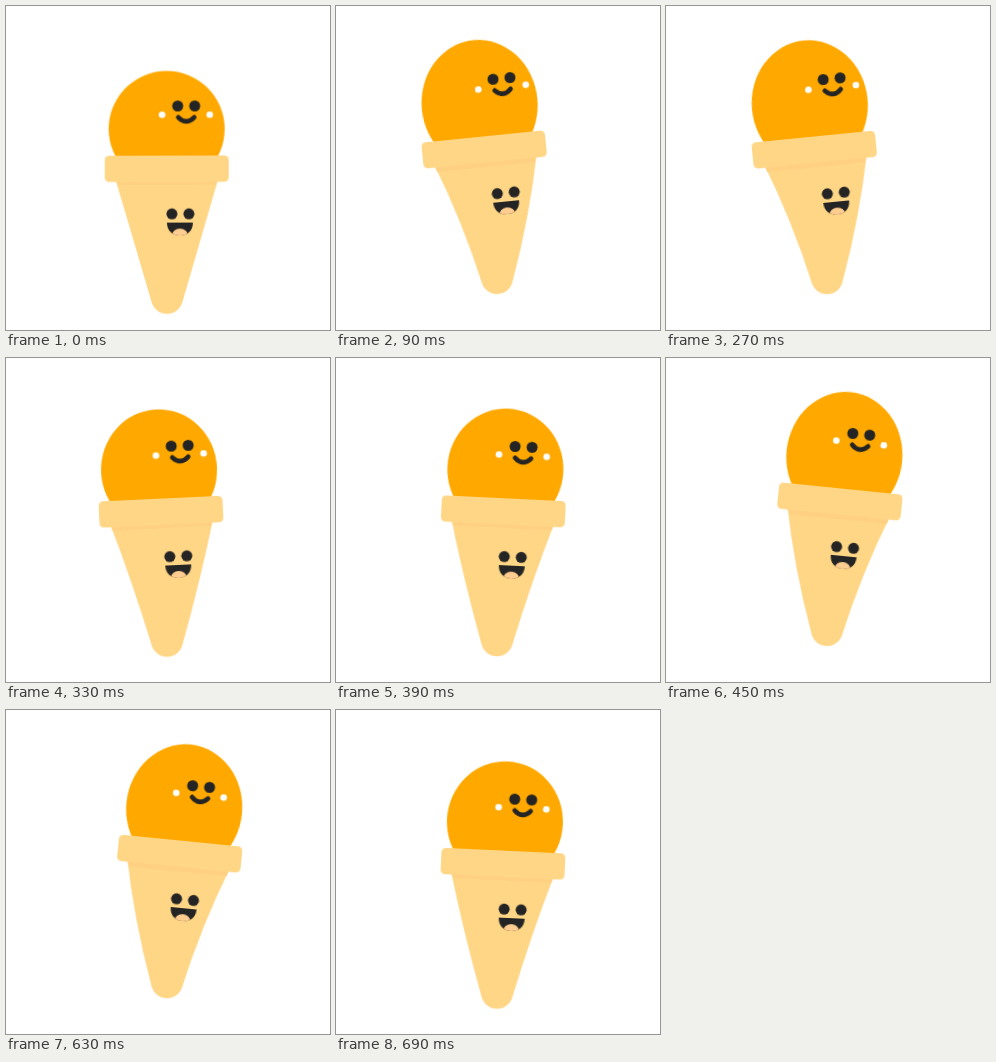
Recreate the animation shown at these times as an HTML page without scripts. Size 324 px wide and 324 px high, loop 0.72 s.

```html
<!DOCTYPE html>
<html lang="en">
<head>
<meta charset="utf-8">
<title>Dancing ice cream cone</title>
<style>
  html, body {
    margin: 0;
    width: 100%;
    height: 100%;
    overflow: hidden;
    background: #fff;
  }
  svg { display: block; width: 100vw; height: 100vh; }

  /* Each animation is half of a swing: out with cubic or quadratic easing, then back. */

  /* The whole cone jumps and leans left, then right, about its tip. */
  .sway { transform-origin: 161px 292px; animation: sway 720ms infinite; }
  @keyframes sway {
    0%, 50%, 100% {
      transform: translateY(0) rotate(0deg);
      animation-timing-function: cubic-bezier(.333, 1, .667, 1);
    }
    25% {
      transform: translateY(-23px) rotate(-6.5deg);
      animation-timing-function: cubic-bezier(.333, 0, .667, 0);
    }
    75% {
      transform: translateY(-23px) rotate(6.5deg);
      animation-timing-function: cubic-bezier(.333, 0, .667, 0);
    }
  }

  /* The sides of the cone bend while it leans. */
  .cone { animation: bend 720ms infinite; }
  @keyframes bend {
    0%, 50%, 100% {
      d: path("M108.6 170 Q127.1 233 145.6 296.5 A16 16 0 0 0 176.4 296.5 Q194.9 233 213.4 170 Z");
      animation-timing-function: cubic-bezier(.333, 1, .667, 1);
    }
    25% {
      d: path("M108.6 170 Q133.1 233 145.6 296.5 A16 16 0 0 0 176.4 296.5 Q200.9 233 213.4 170 Z");
      animation-timing-function: cubic-bezier(.333, 0, .667, 0);
    }
    75% {
      d: path("M108.6 170 Q121.1 233 145.6 296.5 A16 16 0 0 0 176.4 296.5 Q188.9 233 213.4 170 Z");
      animation-timing-function: cubic-bezier(.333, 0, .667, 0);
    }
  }

  /* The scoop stretches upwards on every jump and carries its face along. */
  .hop { animation: hop 360ms infinite; }
  @keyframes hop {
    0%, 100% {
      transform: translateY(0) scaleY(1);
      animation-timing-function: cubic-bezier(.333, .667, .667, 1);
    }
    50% {
      transform: translateY(var(--lift, 0px)) scaleY(var(--stretch, 1));
      animation-timing-function: cubic-bezier(.333, 0, .667, .333);
    }
  }

  /* Faces lag behind the lean. */
  .drift { animation: drift 720ms infinite; }
  @keyframes drift {
    0%, 50%, 100% {
      transform: translateX(0);
      animation-timing-function: cubic-bezier(.333, 1, .667, 1);
    }
    25% {
      transform: translateX(var(--lag));
      animation-timing-function: cubic-bezier(.333, 0, .667, 0);
    }
    75% {
      transform: translateX(calc(-1 * var(--lag)));
      animation-timing-function: cubic-bezier(.333, 0, .667, 0);
    }
  }

  .scoop { --stretch: 1.14; transform-origin: 161px 181.5px; fill: #ffa800; }
  .scoop-face { --lift: -8.5px; --lag: 5.5px; }
  .cone-face { --lag: 4.2px; }
  .wafer { fill: #ffd685; }
  .shade { --lift: 2px; fill: #ffcf82; }
  .ink { fill: #242424; }
  .cheek { fill: #fff; }
  .tongue { fill: #ffcd8f; }
  .smile { fill: none; stroke: #242424; stroke-width: 4.6; stroke-linecap: round; }
</style>
</head>
<body>
<svg viewBox="0 0 324 324">
  <defs>
    <path id="mouth" d="M161 217 H187 C187 225 181.5 230 174 230 S161 225 161 217 Z"/>
    <g id="eyes"><circle r="5.5"/><circle cx="17" r="5.5"/></g>
    <clipPath id="in-mouth"><use href="#mouth"/></clipPath>
  </defs>

  <g class="sway">
    <circle class="scoop hop" cx="161" cy="123.5" r="58"/>
    <path class="wafer cone" d="M108.6 170 Q127.1 233 145.6 296.5 A16 16 0 0 0 176.4 296.5 Q194.9 233 213.4 170 Z"/>
    <path class="shade hop" d="M109.4 170 H212.6 L210 179 H112 Z"/>
    <rect class="wafer" x="99" y="150" width="124" height="26.3" rx="4.5"/>

    <g class="scoop-face hop">
      <g class="drift">
        <use class="ink" href="#eyes" x="172" y="100.5"/>
        <path class="smile" d="M172.5 111.8 Q180.5 120 188.5 111.8"/>
        <circle class="cheek" cx="156.3" cy="109.3" r="3.3"/>
        <circle class="cheek" cx="204" cy="109.3" r="3.3"/>
      </g>
    </g>

    <g class="cone-face drift">
      <use class="ink" href="#eyes" x="166" y="208.3"/>
      <use class="ink" href="#mouth"/>
      <ellipse class="tongue" cx="174" cy="230" rx="8" ry="7" clip-path="url(#in-mouth)"/>
    </g>
  </g>
</svg>
</body>
</html>
```
